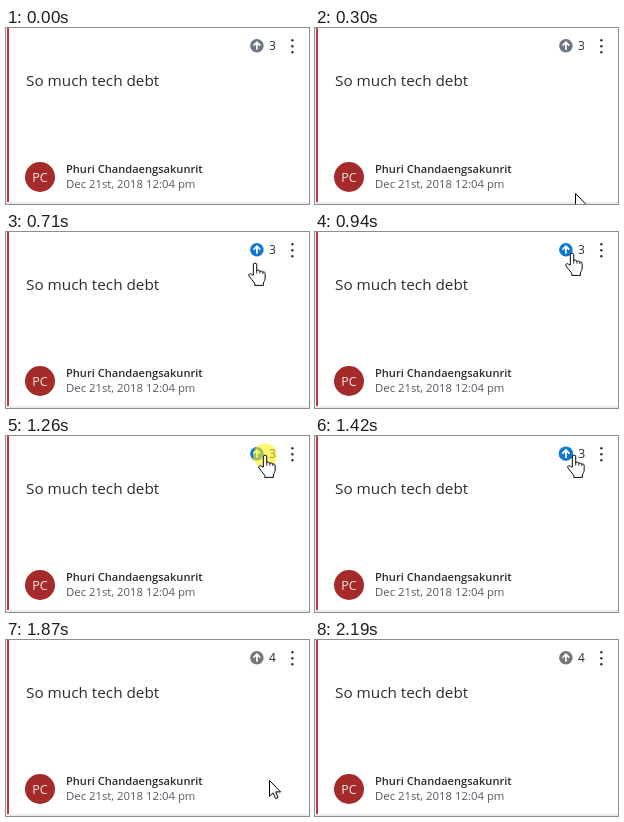
Write an HTML page that moves like this. It is 303 px wide and 176 px high and loops after 2.69 s.

```html
<!DOCTYPE html>
<html lang="en">
<head>
<meta charset="utf-8">
<title>Upvote card</title>
<style>
  html, body { margin: 0; width: 100%; height: 100%; overflow: hidden; background: #fff; }
  svg { display: block; width: 303px; height: 176px; }
  text { font-family: "Open Sans", "Noto Sans", sans-serif; fill: #2b2b33; }
  #badge, #count { transform: scale(var(--pulse, 1)); }
  #badge { transform-origin: 250.9px 17.7px; }
  #count { transform-origin: 264px 17.5px; }
</style>
</head>
<body>
<svg viewBox="0 0 303 176">
  <rect y="174" width="303" height="2" fill="#ebebeb"/>
  <rect x="1" width="2" height="174" fill="#c4313a"/>

  <text x="20" y="58" font-size="15.3">So much tech debt</text>

  <circle cx="34" cy="149" r="15" fill="#a52a2a"/>
  <text x="34" y="153.5" font-size="12.5" text-anchor="middle" style="fill:#f6e6e6">PC</text>
  <text x="60" y="145" font-size="11.1" font-weight="600">Phuri Chandaengsakunrit</text>
  <text x="60" y="160" font-size="11.35" style="fill:#555861">Dec 21st, 2018 12:04 pm</text>

  <g fill="#333">
    <circle cx="286.4" cy="12.2" r="1.2"/>
    <circle cx="286.4" cy="18.2" r="1.2"/>
    <circle cx="286.4" cy="24.2" r="1.2"/>
  </g>

  <g id="badge">
    <circle cx="250.9" cy="17.7" r="6.8"/>
    <path d="M250.9 21.8V14.6M247.5 17.6l3.4-3.4 3.4 3.4" fill="none" stroke="#fff" stroke-width="1.7"/>
  </g>
  <text id="count" x="263" y="22" font-size="12" font-weight="500"></text>

  <circle id="press" cx="259" cy="19.5" r="12" fill="#ffee10" opacity=".6"/>
  <g id="cursor" fill="#fff" stroke="#000" stroke-linejoin="round">
    <path id="arrow" d="M.5 .5V16.3l3.6-3.4 2.5 5.7 2.5-1.1-2.5-5.6h5z"/>
    <g id="hand" transform="translate(-7 -.5) scale(.97)">
      <path d="M5.5 13V2.4a1.75 1.75 0 0 1 3.5 0V9c0-1.6 3.2-1.6 3.3.6.3-1.4 3-1.2 3 .8.4-1 2.4-.9 2.4 1.1V16c0 2-1 3-1.8 5v2.6H7v-2.1C5 19 3 16.5.9 13.8c-1-2 1.6-3 2.8-1.6z"/>
      <path d="M9 9v2.5M12.3 9.6v2M15.3 10.4v1.6" stroke-width=".8"/>
    </g>
  </g>
</svg>
<script>
const LOOP = 2690;

// Pointer samples: time, x, y, shape
const pointer = [
  [0, 0, 0, ""],
  [230, 260, 165, "arrow"], [310, 257, 140, "arrow"], [400, 254, 112, "arrow"],
  [480, 251, 84, "arrow"], [560, 249, 60, "arrow"], [640, 248, 42, "arrow"],
  [710, 249, 31, "hand"], [780, 250, 30, "hand"], [850, 253, 26, "hand"],
  [930, 257, 21, "hand"], [1010, 259, 19, "hand"],
  [1650, 258, 32, "arrow"], [1730, 259, 51, "arrow"], [1790, 261, 98, "arrow"],
  [1870, 263, 140, "arrow"], [1970, 265, 155, "arrow"], [2050, 266, 165, "arrow"],
  [2120, 266, 171, "arrow"], [2190, 0, 0, ""]
];
// Vote scale after the click
const pulse = [[0, 1], [1410, 1.06], [1490, 1.12], [1580, 1.18], [1650, 1.08], [1730, 1]];

const $ = id => document.getElementById(id);
const at = (steps, t) => steps.findLast(s => s[0] <= t);
const show = (id, on) => $(id).setAttribute("visibility", on ? "visible" : "hidden");

function draw(now) {
  const t = now % LOOP;
  const [, x, y, shape] = at(pointer, t);
  const voted = t >= 1650;

  $("cursor").setAttribute("transform", `translate(${x} ${y})`);
  show("arrow", shape === "arrow");
  show("hand", shape === "hand");
  show("press", t >= 1260 && t < 1410);
  document.body.style.setProperty("--pulse", at(pulse, t)[1]);
  $("badge").setAttribute("fill", shape === "hand" ? "#0f78d4" : voted ? "#767676" : "#6d7588");
  $("count").textContent = voted ? 4 : 3;
}

const start = performance.now();
function tick() {
  draw(performance.now() - start);
  requestAnimationFrame(tick);
}
tick();
</script>
</body>
</html>
```
